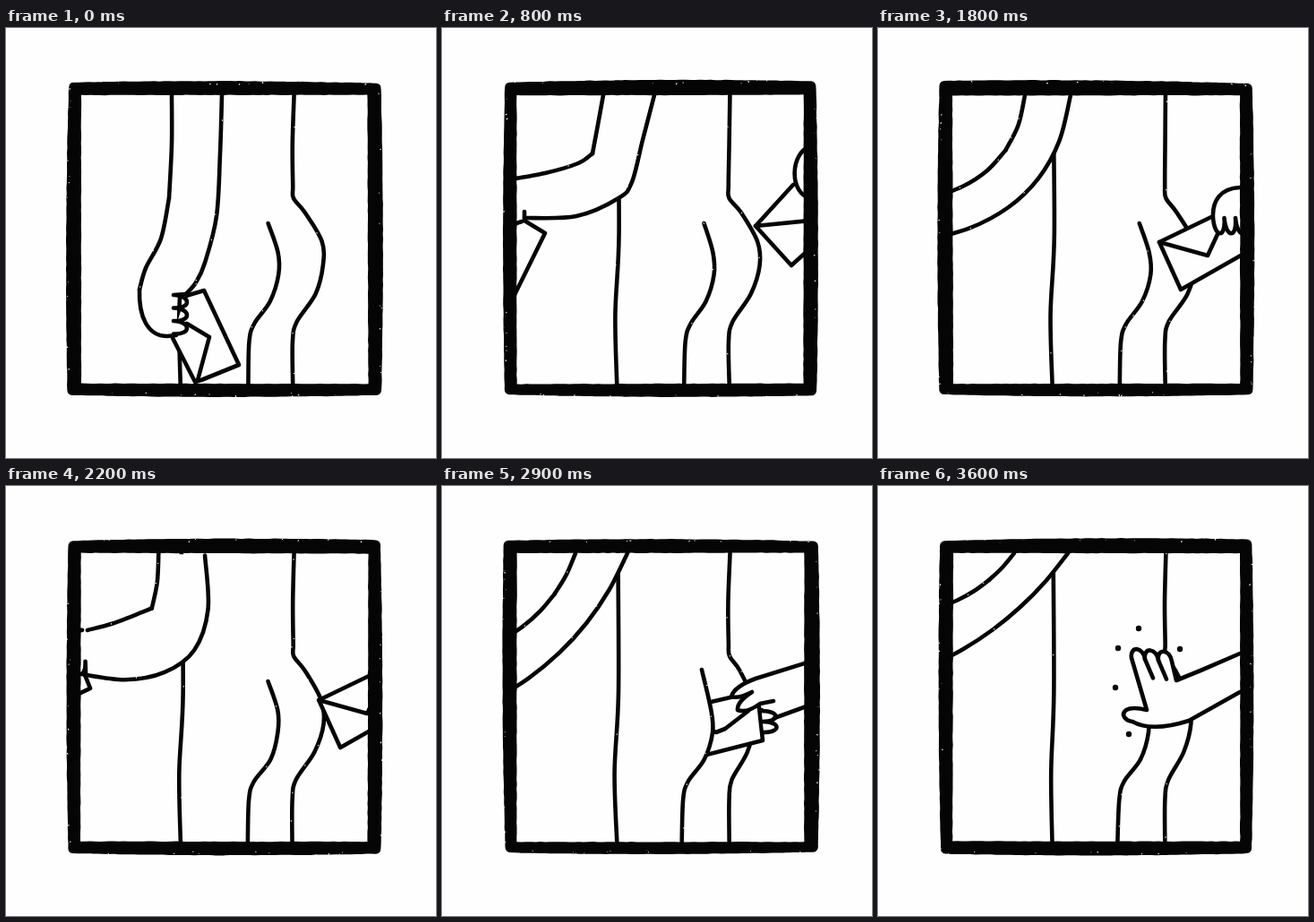
Animation, 480 px wide and 480 px high, one loop 3700 ms. Source, as an HTML page with a canvas:

```html
<!DOCTYPE html>
<html lang="en">
<head>
<meta charset="utf-8">
<title>Around the frame</title>
<style>
html, body { margin: 0; width: 100%; height: 100%; overflow: hidden; background: #fefefe; }
canvas { display: block; }
</style>
</head>
<body>
<canvas id="stage" width="480" height="480"></canvas>
<script>
const ctx = document.getElementById('stage').getContext('2d');
const STEP = 100, LOOP = 3700;
const INK = '#050505', PAPER = '#fefefe';

const pts = s => s.split(' ').map(p => p.split(',').map(Number));
const mix = (a, b, k) => a + (b - a) * k;
const mixPt = (p, q, k) => [mix(p[0], q[0], k), mix(p[1], q[1], k)];
const mixPts = (a, b, k) => a.map((p, i) => mixPt(p, b[i], k));
const smooth = k => k * k * (3 - 2 * k);

let seed = 1;
function rnd() {
  seed = (seed * 16807) % 2147483647;
  return seed / 2147483647;
}
const wob = n => (rnd() - 0.5) * 2 * n;

// Point on an arc from the top edge to the left edge, bowed outwards by sag
function bow(x, y, sag, t) {
  const dx = 83 - x, dy = y - 75, out = 4 * sag * t * (1 - t) / Math.hypot(dx, dy);
  return [x + dx * t + dy * out, 75 + dy * t - dx * out];
}

// Arm stretched out of the frame on the left
function reach(x1, y1, x2, y2, sag) {
  const outer = [0, 1, 2, 3, 4, 5].map(i => bow(x1, y1, sag, i * 0.23));
  return {
    upper: outer.slice(0, 3),
    fore: outer.slice(2),
    inner: outer.map((_, i) => bow(x2, y2, sag * 1.65, i * 0.23))
  };
}
const pose = (upper, fore, inner) => ({ upper: pts(upper), fore: pts(fore), inner: pts(inner) });
const arms = {
  hang: pose('185,75 185,130 182,190', '182,190 173,235 156,268 149,292',
    '241,75 239,140 235,210 222,262 212,284 201,297'),
  out: pose('180,75 174,108 168,140', '168,140 152,151 115,162 70,170',
    '237,75 224,125 212,172 197,190 150,210 92,212'),
  bent: pose('182,75 191,107 200,137', '200,137 178,119 163,111 148,108',
    '235,82 268,160 267,212 235,222 192,202 152,157'),
  poke: reach(164, 182, 215, 230, 20),
  insert: reach(149, 162, 207, 224, 9),
  slap: reach(152, 130, 212, 189, 6)
};

// Each pose is held from one step to another and eased into the next
const holds = [
  ['hang', 0, 2], ['out', 8, 9], ['bent', 13, 14], ['poke', 18, 20],
  ['bent', 25, 26], ['insert', 29, 31], ['slap', 36, 37]
];

const BACK = pts('321,75 320,130 320,176 321,190 334,206 352,238 354,265 345,297 324,328 320,350 320,397');
const CLEFT = pts('292,218 303,250 304,275 295,305 277,330 271,350 270,397');
const TORSO = pts('196,75 197,230 193,320 195,400');

function armAt(n) {
  const i = holds.findLastIndex(h => n >= h[1]);
  const [a, from, to] = holds[i];
  if (n <= to) return { a, b: a, k: 0 };
  const [b, next] = holds[i + 1];
  return { a, b, k: smooth((n - to) / (next - to)) };
}

// Distance to the touching place of something that slides in from the right
function slide(n, start, hit, leave, gone) {
  if (n <= start || n >= gone) return null;
  if (n < hit) return 100 * smooth((hit - n) / (hit - start));
  return n > leave ? 100 * smooth((n - leave) / (gone - leave)) : 0;
}

function trace(path, p, join) {
  if (join) path.lineTo(...p[0]); else path.moveTo(...p[0]);
  for (let i = 0; i < p.length - 1; i++) {
    const a = p[i - 1] || p[i], b = p[i], c = p[i + 1], d = p[i + 2] || c;
    path.bezierCurveTo(b[0] + (c[0] - a[0]) / 6, b[1] + (c[1] - a[1]) / 6,
      c[0] - (d[0] - b[0]) / 6, c[1] - (d[1] - b[1]) / 6, c[0], c[1]);
  }
}

function speck(x, y, r) {
  ctx.fillStyle = PAPER;
  ctx.beginPath();
  ctx.ellipse(x, y, r, r * 0.6, rnd() * 3, 0, 7);
  ctx.fill();
}

function disc(x, y, r) {
  ctx.fillStyle = INK;
  ctx.beginPath();
  ctx.arc(x, y, r, 0, 7);
  ctx.fill();
}

function line(p) {
  const path = new Path2D();
  trace(path, p);
  ctx.stroke(path);
  for (let i = 1; i < p.length; i++) {
    const [x, y] = mixPt(p[i - 1], p[i], rnd());
    if (rnd() < 0.5) speck(x + wob(2), y, 0.9);
  }
}

function draw(d, fill) {
  const path = new Path2D(d);
  if (fill) {
    ctx.fillStyle = PAPER;
    ctx.fill(path);
  }
  ctx.stroke(path);
}

function placed(dx, dy, fn) {
  ctx.save();
  ctx.translate(dx, dy);
  fn();
  ctx.restore();
}

// Row of rounded fingers: start, step along the row, bulge across it
function fingers(count, x, y, ux, uy, vx, vy) {
  let d = `L${x} ${y}`;
  for (let i = 0; i < count; i++) d += `c${vx} ${vy} ${ux + vx} ${uy + vy} ${ux} ${uy}`;
  return d;
}

function handHang() {
  draw('M186 346L211 395L218 393L260 376L221 293L201 299', true);
  draw('M202 330L227 345L214 393');
  draw('M190 343L180 344C158 344 148 322 149 292' , true);
  draw('M201 297' + fingers(3, 187, 298, 0, 14.5, 20, 1), true);
}
function handOut() {
  draw('M92 205L92 215L115 229L75 310M80 219L89 216');
}
function handBent() {
  draw('M116 129L70 155M114 152L104 179L70 171M151 158L157 173L70 214');
  draw('M148 108Q119 110' + ' 114 137' + fingers(3, 114, 137, 12.5, 2, 1, 20) + 'L152 157', true);
}

function farPeek() {
  draw('M500 130L392 175L350 221L390 265L440 220', true);
  draw('M350 221L410 215');
  draw('M412 132C388 138 387 186 412 190', true);
}
function farPoke() {
  draw('M372 211L314 239L338 292L500 200', true);
  draw('M314 239L368 254L380 228');
  draw('M500 178L404 178C382 179 373 193 374 212' + fingers(3, 374, 212, 12.5, 0, 2, 23), true);
}
function farLetter() {
  draw('M270 248L352 229L358 284L272 306Z', true);
  draw('M270 262L306 275L316 271L342 251');
}
function farPush() {
  draw('M357 250' + fingers(2, 357, 251, 1, 12, 20, 0), true);
  draw('M440 187L350 215Q326 224 323 235Q330 238 346 230Q329 241 330 250Q340 254 355 243L370 240', true);
  draw('M371 259L404 247L440 235');
}
function farSlap() {
  draw('M300 250L283 192' + fingers(3, 283, 192, 15, 1.3, -2, -14) +
    'L333 217L360 206L404 187L540 130L540 165L404 230L347 262' +
    'C325 269 302 273 284 263C277 262 270 256 277 250Q284 246 300 250', true);
  for (let i = 1; i < 3; i++) draw(`M${283 + 15 * i} ${192 + 1.3 * i}l9 21`);
}
function burst() {
  for (const [x, y] of pts('291,159 268,181 337,182 265,225 280,277')) disc(x, y, 3.2);
}

function wrist(arm) {
  return mixPt(arm.fore.at(-1), arm.inner.at(-1), 0.5);
}

function drawArm(n) {
  const { a, b, k } = armAt(n);
  const arm = {};
  for (const part in arms.hang) arm[part] = mixPts(arms[a][part], arms[b][part], k);

  const body = new Path2D();
  trace(body, arm.upper);
  trace(body, arm.fore, true);
  trace(body, [...arm.inner].reverse(), true);
  ctx.fillStyle = PAPER;
  ctx.fill(body);
  Object.values(arm).forEach(line);

  const bend = (a === 'bent' ? 1 - k : 0) + (b === 'bent' ? k : 0);
  if (bend > 0.5) {
    const [x, y] = arm.fore[0], s = Math.min(bend, 1);
    line([[x, y], [x + 25 * s, y + 23 * s], [x + 50 * s, y + 34 * s]]);
  }

  const [x, y] = wrist(arm);
  const [hx, hy] = wrist(a === 'hang' ? arms.hang : arms.bent);
  if (a === 'hang') {
    placed(x, y, () => {
      ctx.rotate(k * 1.3);
      ctx.translate(-hx, -hy);
      handHang();
    });
  } else if (a === 'out' && k === 0) {
    handOut();
  } else {
    placed(x - hx, y - hy, handBent);
  }
}

function drawFar(n) {
  const near = (fn, ...times) => {
    const dx = slide(n, ...times);
    if (dx !== null) placed(dx, 0, fn);
  };
  near(farPeek, 6, 8, 9, 11);
  near(farPoke, 14, 18, 20, 25);
  near(farPush, 26, 29, 31, 33);
  near(farSlap, 33, 35, 36, 38);
  if (n >= 35) burst();
  if (n === 13 || n === 25) disc(405, 186, 4.5);
}

function drawBody(n) {
  const press = (n >= 29 && n <= 31) || n >= 35 ? 1 : 0;
  const loose = p => p.map(([x, y]) => [x + wob(0.7), y]);
  const back = BACK.map(([x, y]) => [x - press * 0.16 * Math.max(0, x - 321), y]);
  const cleft = CLEFT.map(([x, y], i) => [x - press * 2, i ? y : y - press * 13]);
  line(loose(TORSO));
  line(loose(back));

  // The letter slips in behind the cleft line
  const dx = slide(n, 26, 29, 31, 32);
  if (dx !== null) {
    ctx.save();
    const edge = new Path2D();
    trace(edge, cleft.slice(0, 4));
    edge.lineTo(420, 320);
    edge.lineTo(420, 205);
    ctx.clip(edge);
    placed(dx - 20 * Math.max(0, n - 29), 0, farLetter);
    ctx.restore();
  }
  line(loose(cleft));
}

// Hand-drawn rectangle whose sides swell outwards
function roughLoop(corners, swell, amp) {
  corners.forEach((p, side) => {
    const q = corners[(side + 1) % 4];
    for (let j = 0; j < 60; j++) {
      const k = j / 60, out = 4 * k * (1 - k) * swell;
      const [x, y] = mixPt(p, q, k);
      ctx.lineTo(x + [0, out, 0, -out][side] + wob(amp), y + [-out, 0, out, 0][side] + wob(amp));
    }
  });
  ctx.closePath();
}

function drawBorder() {
  const box = (l, t, r, b, w) => [[l, t], [r, t], [r, b], [l, b]].map(([x, y]) => [x + wob(w), y + wob(w)]);
  const outer = box(75, 66, 413, 404, 1.5);
  ctx.fillStyle = INK;
  ctx.beginPath();
  roughLoop(outer, 2, 0.25);
  ctx.lineWidth = 11;
  ctx.stroke();

  // Fill the band between the rounded outer line and the window
  const window = box(83.5, 75, 404, 397, 0.6);
  ctx.beginPath();
  roughLoop(outer, 2, 0);
  ctx.moveTo(...window[0]);
  roughLoop(window, 0, 0.25);
  ctx.fill('evenodd');

  for (let i = 0; i < 40; i++) {
    const side = i % 4, deep = 3 + rnd() * 4;
    const [x, y] = mixPt(outer[side], outer[(side + 1) % 4], rnd());
    speck(x + [0, deep, 0, -deep][side], y + [-deep, 0, deep, 0][side], 0.4 + rnd() * 0.7);
  }
}

function render(n) {
  seed = 971 + n * 7919;
  ctx.fillStyle = PAPER;
  ctx.fillRect(0, 0, 480, 480);
  ctx.strokeStyle = INK;
  ctx.lineWidth = 4.6;
  ctx.lineCap = ctx.lineJoin = 'round';

  ctx.save();
  ctx.beginPath();
  ctx.rect(78, 70, 331, 332);
  ctx.clip();
  drawBody(n);
  drawArm(n);
  drawFar(n);
  ctx.restore();
  drawBorder();
}

let shown = -1;
function tick() {
  let n = Math.floor((performance.now() % LOOP) / STEP);
  if (n === 19) n = 18;
  if (n !== shown) render(shown = n);
  requestAnimationFrame(tick);
}
tick();
</script>
</body>
</html>
```
